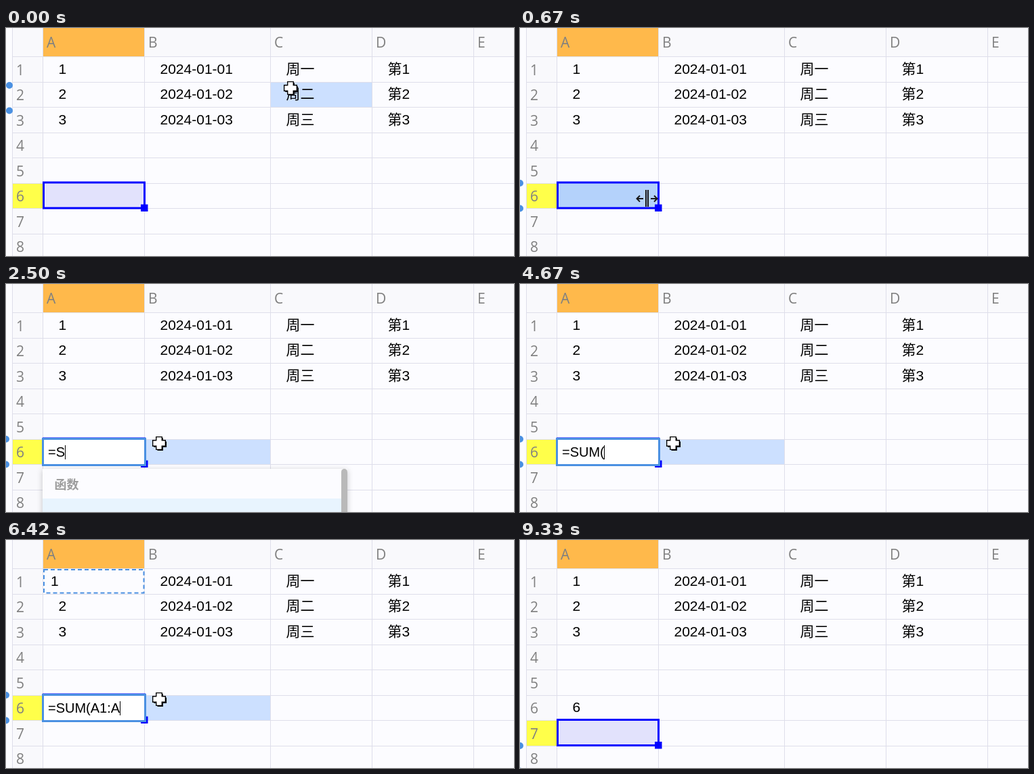
Write an HTML page that moves like this. It is 750x338 px and loops after 9910 ms.

```html
<!DOCTYPE html>
<html lang="zh">
<head>
<meta charset="utf-8">
<title>Spreadsheet sum</title>
<style>
  html, body { margin: 0; width: 100%; height: 100%; overflow: hidden; background: #fcfcff; }
  svg { display: block; width: 750px; height: 338px; }
  text { white-space: pre; }
  .cell { font: 21px "Liberation Sans", Arial, "Noto Sans CJK SC", "Noto Sans CJK", sans-serif; fill: #000; }
  .head { font: 21px "Open Sans", "Noto Sans", sans-serif; fill: #808080; }
  .edit { font: 20px "Liberation Sans", Arial, sans-serif; fill: #000; }
  .title { font: bold 18px "Noto Sans CJK SC", "Noto Sans CJK", sans-serif; fill: #9c9c9c; }
  .line { stroke: #dedeea; }
  .hover { fill: #cce0ff; }
  .knob { fill: #4a90e2; }
  .dash { fill: none; stroke: #4a90e2; stroke-width: 2; stroke-dasharray: 6 4; }
  .panel { fill: #fcfcff; filter: drop-shadow(0 2px 4px rgba(0, 0, 0, .22)); }
</style>
</head>
<body>
<svg viewBox="0 0 750 338">
  <rect width="750" height="338" fill="#fcfcff"/>
  <path d="M10 0H750V42H54V338H10Z" fill="#f9f9fc"/>
  <rect x="55" width="149.5" height="42" fill="#ffb94b"/>
  <rect id="rowMark" x="10" width="44.5" height="37" fill="#ffff4a"/>
  <rect id="hover" class="hover" height="37"/>
  <g id="grid"></g>
  <g id="selection">
    <rect id="selBox" x="55.5" y="-.5" width="149" height="38" stroke="#00f" stroke-width="3"/>
    <rect x="199" y="32" width="10.5" height="10.5" fill="#00f"/>
  </g>
  <g id="cells"></g>
  <g id="marks"></g>
  <g id="popup">
    <rect class="panel" x="54" y="274" width="450" height="90"/>
    <text class="title" x="71.5" y="303.5">函数</text>
    <rect id="item" x="54" y="318" width="441" height="20" fill="#e8f4fe"/>
    <rect id="bar" x="495" y="274" width="9" height="80" rx="4.5" fill="#b9b9b9"/>
  </g>
  <g id="editor">
    <rect x="54.5" y="229.5" width="151" height="39" fill="#fff" stroke="#4a90e2" stroke-width="3"/>
    <text id="formula" class="edit" x="62" y="256"></text>
    <path id="caret" d="M.5 239V260" stroke="#000"/>
  </g>
  <circle id="knobA" class="knob" r="5"/>
  <circle id="knobB" class="knob" r="5"/>
  <g id="plus">
    <g transform="translate(0 -1) scale(.85)">
      <path d="M-3 -9H7V-3H13V7H7V13H-3V7H-9V-3H-3Z"/>
      <path d="M-5 -11H5V-5H11V5H5V11H-5V5H-11V-5H-5Z" fill="#fff" stroke="#000" stroke-width="1.6"/>
    </g>
  </g>
  <path id="resize" fill="none" stroke="#181818" stroke-width="2"
        d="M-1 -13V12M2 -13V12M-5 0H-14M-10 -4.5L-14.5 0L-10 4.5M6 0H15M11 -4.5L15.5 0L11 4.5"/>
  <path id="beam" fill="none" stroke="#222" stroke-width="1.4" d="M-4 -11H4M-4 11H4M0 -11V11"/>
</svg>
<script>
const LOOP = 9910, ROW = 37.5, TOP = 42.5;
const cols = [54.5, 204.5, 390.5, 540.5, 690.5, 840.5];
const $ = id => document.getElementById(id);
const rowY = r => TOP + ROW * (r - 1);

function add(parent, tag, attrs, text) {
  const el = document.createElementNS("http://www.w3.org/2000/svg", tag);
  for (const k in attrs) el.setAttribute(k, attrs[k]);
  if (text) el.textContent = text;
  return $(parent).appendChild(el);
}
const set = (id, attrs) => {
  for (const k in attrs) $(id).setAttribute(k, attrs[k]);
};
const show = (el, on) => { el.style.display = on ? "" : "none"; };
const move = (id, x, y) => set(id, { transform: `translate(${x} ${y})` });

// Grid, headings and data
for (const x of [9.5, ...cols]) add("grid", "path", { class: "line", d: `M${x} 0V338` });
for (let r = 1; r <= 8; r++) {
  const y = Math.floor(rowY(r)) + .5;
  add("grid", "path", { class: "line", d: `M10 ${y}H750` });
  add("grid", "text", { class: "head", x: 15, y: rowY(r) + 27 }, String(r));
}
[..."ABCDE"].forEach((c, i) => add("grid", "text", { class: "head", x: cols[i] + 5.5, y: 28.5 }, c));

const cell = (c, r, text) =>
  add("cells", "text", { class: "cell", x: cols[c] + 23, y: rowY(r) + 25 }, text);
const firstCol = [], dashes = [];
["一", "二", "三"].forEach((day, i) => {
  const r = i + 1;
  firstCol.push(cell(0, r, String(r)));
  cell(1, r, "2024-01-0" + r);
  cell(2, r, "周" + day);
  cell(3, r, "第" + r);
  dashes.push(add("marks", "rect", { class: "dash", x: 56, y: rowY(r) + 1.5, width: 147.5, height: 34.5 }));
});
const total = cell(0, 6, "6");

// Pointer: time, x, y, shape
const pointer = [
  [0, 420, 90, "plus"], [80, 418, 94, "plus"], [170, 408, 108, "plus"], [250, 378, 138, "plus"],
  [330, 330, 172, "plus"], [420, 280, 205, "plus"], [500, 236, 234, "plus"], [580, 207, 248, "resize"],
  [670, 187, 253, "resize"], [750, 178, 252, "plus"], [830, 172, 251, "plus"], [920, 168, 250, "plus"],
  [1250, 168, 250, "beam"], [1580, 182, 246, "beam"], [1670, 212, 239, "plus"], [1750, 226, 237, "plus"],
  [9170, 232, 270, "plus"], [9250, 240, 318, "plus"], [9330, 245, 400, "plus"]
];
const typing = [
  [1250, ""], [2170, "="], [2500, "=S"], [2750, "=SU"], [2920, "=SUM"], [3580, "=SUM("],
  [4830, "=SUM(A"], [5170, "=SUM(A1"], [6000, "=SUM(A1:"], [6420, "=SUM(A1:A"],
  [6830, "=SUM(A1:A3"], [7670, "=SUM(A1:A3)"]
];
const caretOff = [[1750, 2170], [3500, 3580], [4170, 4670], [5750, 6000], [7330, 7670], [8250, 8330]];
const popupOn = [[2170, 3580], [4830, 6000]];

const latest = (list, t) => list.filter(e => e[0] <= t).pop();
const within = (list, t) => list.some(([a, b]) => t >= a && t < b);

function render(t) {
  const [, x, y, shape] = latest(pointer, t);
  const done = t >= 8330, editing = t >= 1250 && !done;
  const selRow = done ? 7 : 6;
  const row = Math.floor((y - TOP) / ROW) + 1;
  const col = cols.findIndex((c, i) => x >= c && x < cols[i + 1]);
  const onSel = col === 0 && row === selRow;

  for (const id of ["plus", "resize", "beam"]) {
    show($(id), id === shape);
    move(id, x, y);
  }
  set("hover", { x: cols[col] + .5, y: rowY(row) + .5, width: cols[col + 1] - cols[col] - .5 });
  set("rowMark", { y: rowY(selRow) + .5 });
  move("selection", 0, rowY(selRow) - .5);
  set("selBox", { fill: onSel ? "#b4d2fb" : "#e2e2fc" });

  // Row handles settle on the row edges just after the loop begins
  const shift = t < 80 ? 5 : 0, edge = rowY(Math.min(row, 8));
  set("knobA", { cx: shift, cy: edge + shift });
  set("knobB", { cx: shift, cy: edge + ROW + shift });

  const refs = !editing || t < 5170 ? 0 : t < 6830 ? 1 : 3;
  dashes.forEach((d, i) => {
    show(d, i < refs);
    firstCol[i].setAttribute("x", cols[0] + (i < refs ? 11.5 : 23));
  });

  show($("editor"), editing);
  show($("popup"), within(popupOn, t));
  show($("item"), t >= 2500 && t < 5170);
  show($("bar"), t < 5170);
  show(total, done);
  if (editing) {
    $("formula").textContent = latest(typing, t)[1];
    const w = $("formula").textContent ? $("formula").getComputedTextLength() : 0;
    move("caret", Math.floor(62 + w), 0);
    show($("caret"), !within(caretOff, t));
  }
}

const start = performance.now();
function tick() {
  render((performance.now() - start) % LOOP);
  requestAnimationFrame(tick);
}
tick();
</script>
</body>
</html>
```
